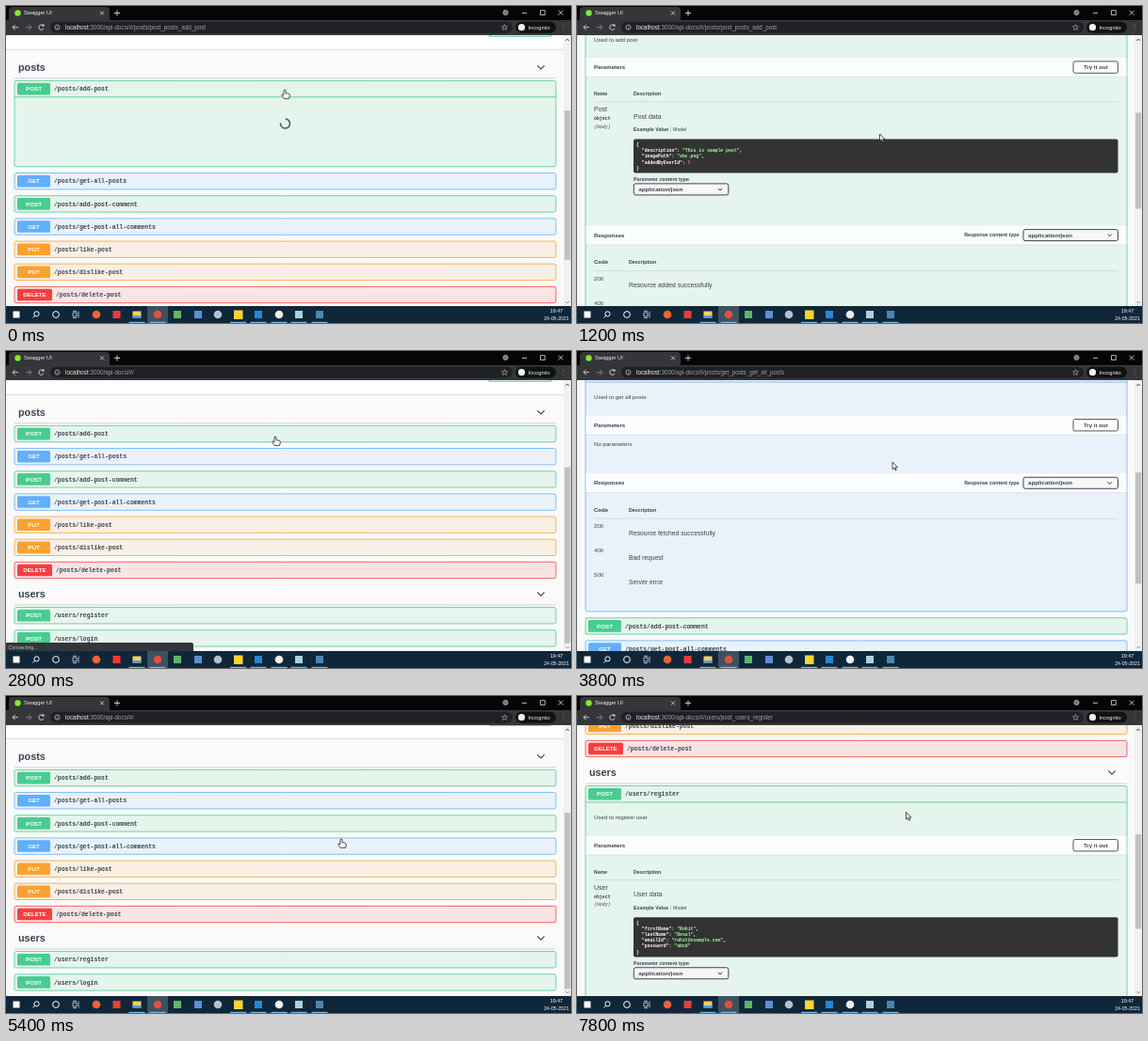
These frames come from a looping animation (600 by 337 pixels, 8000 ms). An HTML page with a canvas:

```html
<!DOCTYPE html>
<html lang="en">
<head>
<meta charset="utf-8">
<title>API docs walkthrough</title>
<style>
html, body { margin: 0; width: 100%; height: 100%; overflow: hidden; background: #fafafa }
canvas { display: block; width: 600px; height: 337px }
</style>
</head>
<body>
<canvas id="stage"></canvas>
<script>
const LOOP = 8000, STEP = 200;
const TOP = 31, BOTTOM = 319, PAGE = 417, INK = '#3b4151';
const SANS = '"Liberation Sans", Arial, sans-serif';
const MONO = '"Liberation Mono", monospace';
const canvas = document.getElementById('stage'), c = canvas.getContext('2d');
const dpr = window.devicePixelRatio || 1;
canvas.width = 600 * dpr;
canvas.height = 337 * dpr;

const COLORS = {
  POST: ['#49cc90', '#e5f4ec'], GET: ['#61affe', '#e9f2fb'],
  PUT: ['#fca130', '#faefe4'], DELETE: ['#f93e3e', '#f9e4e4']
};
const SECTIONS = [
  ['posts', [
    ['POST', '/posts/add-post'], ['GET', '/posts/get-all-posts'],
    ['POST', '/posts/add-post-comment'], ['GET', '/posts/get-post-all-comments'],
    ['PUT', '/posts/like-post'], ['PUT', '/posts/dislike-post'],
    ['DELETE', '/posts/delete-post']]],
  ['users', [['POST', '/users/register'], ['POST', '/users/login']]]
];
const DETAILS = {
  '/posts/add-post': {
    url: 'posts/post_posts_add_post', about: 'Used to add post', body: 'Post',
    fields: [['description', '"This is sample post"'], ['imagePath', '"abc.png"'], ['addedByUserId', '5']],
    done: 'Resource added successfully', extra: 348
  },
  '/posts/get-all-posts': {
    url: 'posts/get_posts_get_all_posts', about: 'Used to get all posts',
    done: 'Resource fetched successfully', extra: 244
  },
  '/users/register': {
    url: 'users/post_users_register', about: 'Used to register user', body: 'User',
    fields: [['firstName', '"Rohit"'], ['lastName', '"Desul"'], ['emailId', '"rohit@example.com"'], ['password', '"abcd"']],
    done: 'User registered successfully', extra: 360
  }
};
// [start, open operation, loading]
const STATES = [
  [0, '/posts/add-post', true], [200, '/posts/add-post'], [2800, ''],
  [3200, '/posts/get-all-posts', true], [3400, '/posts/get-all-posts'], [4800, ''],
  [6000, '/users/register', true], [6200, '/users/register']
];
const SCROLL = [
  [0, 127], [600, 127], [1000, 171], [1200, 204.5], [1400, 215], [1600, 215], [2400, 127],
  [3400, 127], [3800, 215], [4000, 215], [4400, 83], [4800, 83], [5200, 128],
  [6200, 128], [6400, 196], [7000, 304]
];
const POINTER = [
  [0, 296, 89], [400, 296, 89], [800, 320, 130], [1200, 321.5, 136], [1600, 321.5, 136],
  [2400, 286, 91], [2800, 286, 91], [3000, 292, 110], [3200, 292, 110], [3600, 330, 118],
  [4400, 350, 118.5], [4600, 356, 152], [5400, 356, 152], [5800, 358, 278], [6000, 358, 278],
  [6400, 360, 271], [7400, 348.5, 285], [7800, 349.5, 123.5]
];

function at(keys, t) {
  const i = keys.findIndex(k => k[0] > t);
  if (i < 0) return keys[keys.length - 1].slice(1);
  const a = keys[i - 1], b = keys[i], u = (t - a[0]) / (b[0] - a[0]);
  return a.slice(1).map((v, j) => v + (b[j + 1] - v) * u);
}
function rect(x, y, w, h, fill) {
  c.fillStyle = fill;
  c.fillRect(x, y, w, h);
}
function box(x, y, w, h, r, fill, stroke, width = 0.8) {
  c.beginPath();
  c.roundRect(x, y, w, h, r);
  if (fill) { c.fillStyle = fill; c.fill(); }
  if (stroke) { c.strokeStyle = stroke; c.lineWidth = width; c.stroke(); }
}
function disc(x, y, r, fill, stroke) {
  box(x - r, y - r, 2 * r, 2 * r, r, fill, stroke, 1);
}
function line(color, width, ...p) {
  c.beginPath();
  for (let i = 0; i < p.length; i += 2) c.lineTo(p[i], p[i + 1]);
  c.strokeStyle = color;
  c.lineWidth = width;
  c.stroke();
}
// y is the visual middle of the text; returns the right end
function text(s, x, y, size, { color = INK, style = '', font = SANS, align = 'left' } = {}) {
  c.font = `${style} ${size}px ${font}`;
  c.fillStyle = color;
  c.textAlign = align;
  c.fillText(s, x, y + size * 0.34);
  return x + c.measureText(s).width;
}
const bold = (s, x, y, size, opts) => text(s, x, y, size, { style: 'bold', ...opts });
const code = (s, x, y, color) => bold(s, x, y, 4.8, { font: MONO, color });

function band(title, y) {
  rect(0 + 9.5, y - 10, 574, 20, 'rgba(255,255,255,.82)');
  rect(9.5, y + 10, 574, 0.8, 'rgba(0,0,0,.08)');
  bold(title, 18, y, 6.1);
}
function select(x, y) {
  box(x, y - 6, 100.5, 12, 2, '#f7f7f7', '#41444e', 1);
  bold('application/json', x + 5, y, 6.2);
  line('#222', 0.9, x + 89.5, y - 1, x + 91.7, y + 1.2, x + 93.9, y - 1);
}
function rule(y) {
  rect(18, y, 557, 0.6, 'rgba(59,65,81,.2)');
}

function responses(y, d) {
  band('Responses', y);
  bold('Response content type', 469.5, y, 5.3, { align: 'right' });
  select(474, y);
  bold('Code', 18, y + 28.5, 6);
  bold('Description', 55, y + 28.5, 5.3);
  rule(y + 37.5);
  [['200', d.done], ['400', 'Bad request'], ['500', 'Server error']].forEach(([n, s], i) => {
    text(n, 18, y + 46 + 26 * i, 6.1);
    text(s, 55, y + 53 + 26 * i, 6.8);
  });
}

function details(y, d) {
  text(d.about, 18, y + 25, 6.14);
  band('Parameters', y + 54.5);
  box(527, y + 48.3, 47.5, 12.4, 2, '#fff', '#555', 1);
  bold('Try it out', 550.8, y + 54.5, 6.1, { align: 'center' });
  if (!d.body) {
    text('No parameters', 18, y + 75, 6.14);
    responses(y + 116, d);
    return;
  }
  bold('Name', 18, y + 82.7, 5.2);
  bold('Description', 60, y + 82.7, 5.3);
  rule(y + 91);
  text(d.body, 18, y + 99.3, 7);
  bold('object', 18, y + 109, 4.9, { font: MONO });
  text('(body)', 18, y + 117.3, 4.9, { font: MONO, style: 'italic bold', color: '#777' });
  text(d.body + ' data', 60, y + 106.8, 7);
  bold('Example Value', 60, y + 120.5, 5.3);
  rect(99.3, y + 117.5, 0.5, 6, '#aaa');
  text('Model', 102, y + 120.5, 5.3);

  const n = d.fields.length, h = 17.4 + 6.2 * n, end = y + 131 + h;
  box(60, y + 131, 514.5, h, 2, '#333');
  code('{', 63, y + 136.7, '#fff');
  d.fields.forEach(([key, value], i) => {
    const ly = y + 136.7 + 6.2 * (i + 1);
    let x = code(`"${key}"`, 68.8, ly, '#fff');
    x = code(': ', x, ly, '#fff');
    x = code(value, x, ly, value[0] === '"' ? '#a2fca2' : '#d36363');
    if (i < n - 1) code(',', x, ly, '#fff');
  });
  code('}', 63, y + 136.7 + 6.2 * (n + 1), '#fff');
  bold('Parameter content type', 60, end + 6.7, 5.3);
  select(60.3, end + 17.3);
  responses(end + 66, d);
}

function operation([method, path], y, open, loading, extra) {
  const [main, tint] = COLORS[method], wide = method === 'DELETE' ? 37 : 35;
  box(9, y - 8.7, 575, 17.4 + extra, 2, tint, main);
  box(12, y - 6.3, wide, 12.6, 1.5, main);
  bold(method, 12 + wide / 2, y, 6.2, { color: '#fff', align: 'center' });
  bold(path, wide + 16, y, 6.43, { font: MONO });
  if (!open) return;
  rect(9, y + 8.3, 575, 0.8, main);
  if (loading) {
    c.beginPath();
    c.arc(296.5, y + 37, 5, -1.5, 3.3);
    c.strokeStyle = '#555';
    c.lineWidth = 1.5;
    c.stroke();
  } else details(y, DETAILS[path]);
}

// Draws the document; returns whether the pointer is over something clickable
function page(scroll, open, loading, extra, py) {
  let y = 192.5 - scroll, hot = false;
  rect(0, TOP, 600, BOTTOM - TOP, '#fafafa');
  rect(0, y - 61.5, 592, 42, '#fff');
  rect(0, y - 19.5, 592, 1, '#dedede');
  box(513, y - 48.2, 66, 15, 2, '#fff', '#49cc90', 1.1);
  bold('Authorize', 524, y - 40.5, 6.2, { color: '#49cc90' });
  box(562, y - 41, 6, 4.2, 0.6, '#49cc90');
  box(563.2, y - 44, 3.6, 4.5, 1.7, null, '#49cc90', 0.9);
  for (const [title, ops] of SECTIONS) {
    bold(title, 13, y, 10.8);
    line(INK, 1.1, 564.3, y - 2.2, 568, y + 1.5, 571.7, y - 2.2);
    rect(9, y + 11, 575, 0.7, 'rgba(59,65,81,.3)');
    hot ||= Math.abs(py - y) < 11;
    y += 22.6;
    for (const op of ops) {
      const isOpen = op[1] === open, grow = isOpen ? extra : 0;
      hot ||= Math.abs(py - y) < 8.7;
      operation(op, y, isOpen, loading, grow);
      y += 24.15 + grow;
    }
    y += 1.5;
  }
  const total = PAGE + extra, track = 271;
  rect(592, TOP, 8, BOTTOM - TOP, '#f1f1f1');
  rect(593, 41 + scroll / total * track, 6.3, 288 / total * track, '#c1c1c1');
  line('#555', 1, 594.3, 37, 596.2, 35, 598.1, 37);
  line('#999', 1, 594.3, 314, 596.2, 316, 598.1, 314);
  return hot;
}

function browser(route) {
  const pale = '#dadce0';
  rect(0, 0, 600, 16, '#050506');
  rect(0, 15, 600, 16, '#35363a');
  box(3, 1, 107, 15, [4, 4, 0, 0], '#35363a');
  disc(12.5, 7.5, 3.2, '#85ea2d');
  text('Swagger UI', 19, 7.5, 5.7, { color: '#eee' });
  line(pale, 0.8, 100, 5.5, 104, 9.5);
  line(pale, 0.8, 104, 5.5, 100, 9.5);
  line(pale, 0.9, 115, 7.5, 121, 7.5);
  line(pale, 0.9, 118, 4.5, 118, 10.5);
  disc(530.5, 7, 2.6, '#777', '#999');
  line(pale, 0.8, 548, 7.5, 553, 7.5);
  box(567.5, 4.7, 4.8, 4.8, 0, null, pale);
  line(pale, 0.8, 586.5, 4.7, 591.5, 9.7);
  line(pale, 0.8, 591.5, 4.7, 586.5, 9.7);

  line(pale, 0.9, 13, 22.7, 7, 22.7);
  line(pale, 0.9, 9.8, 19.9, 7, 22.7, 9.8, 25.5);
  line('#888', 0.9, 21, 22.7, 27, 22.7);
  line('#888', 0.9, 24.2, 19.9, 27, 22.7, 24.2, 25.5);
  c.beginPath();
  c.arc(37.5, 22.7, 2.7, 0.4, 5.6);
  c.strokeStyle = pale;
  c.lineWidth = 0.9;
  c.stroke();
  rect(38.5, 19.6, 2, 2, pale);
  box(47, 16.7, 491, 12, 6, '#202124');
  disc(54.5, 22.7, 2.5, null, '#aaa');
  rect(54.1, 22.3, 0.8, 2, '#aaa');
  const x = text('localhost', 63, 22.7, 6.28, { color: '#f2f2f2' });
  text(':3000/api-docs/#/' + route, x, 22.7, 6.28, { color: '#9aa0a6' });
  c.beginPath();
  for (let i = 0; i < 10; i++) {
    const a = i * Math.PI / 5 - Math.PI / 2, r = i % 2 ? 1.4 : 3.2;
    c.lineTo(529.5 + r * Math.cos(a), 22.9 + r * Math.sin(a));
  }
  c.closePath();
  c.lineWidth = 0.7;
  c.stroke();
  box(541, 16.7, 43, 12, 6, '#111214');
  disc(547.5, 22.7, 3.6, '#f1f3f4');
  text('Incognito', 554.5, 22.7, 5.7, { color: '#f1f3f4' });
  [20, 22.7, 25.4].forEach(y => disc(592, y, 0.4, pale, null));
}

function taskbar() {
  rect(0, BOTTOM, 600, 18, '#10273a');
  rect(150, BOTTOM, 22, 18, '#3d5160');
  const y = 328, dot = (x, fill) => disc(x, y, 4.3, fill), tile = (x, fill) => rect(x - 4, y - 4, 8, 8, fill);
  rect(7.5, y - 3.5, 7, 7, '#fff');
  disc(32.5, y - 0.7, 2.6, null, '#fff');
  line('#fff', 1, 30.6, y + 1.2, 28.6, y + 3.4);
  disc(53, y, 3.4, null, '#fff');
  box(71, y - 2, 4, 4, 0, null, '#ddd');
  line('#ddd', 0.8, 77, y - 3.5, 77, y + 3.5);
  line('#ddd', 0.8, 71, y - 3.7, 75, y - 3.7);
  line('#ddd', 0.8, 71, y + 3.7, 75, y + 3.7);
  dot(96, '#ef6337');
  tile(117.5, '#ef3b32');
  rect(134.5, y - 3.5, 9, 7, '#f8d061');
  rect(134.5, y + 1, 9, 2.5, '#4aa3df');
  dot(161, '#e3503e');
  tile(182, '#62b568');
  tile(204, '#5d8fd6');
  dot(225, '#b9c0cc');
  rect(242, y - 4.5, 9.5, 9.5, '#fbd433');
  tile(268, '#2389d4');
  dot(290, '#f0f0f0');
  tile(311, '#a9d3dc');
  tile(333, '#4b86ad');
  [139, 161, 246.5, 268, 290, 311, 333].forEach(x => rect(x - 8.5, 335.8, 17, 1.2, '#76b9ed'));
  const opts = { color: '#fff', align: 'center' };
  text('19:47', 584.5, 324, 5.4, opts);
  text('24-05-2021', 584.5, 332, 5.2, opts);
}

function pointer(x, y, hand) {
  const shape = hand
    ? 'M-1 .6Q0-.6 1 .6V3.6L4.6 4.4Q5.4 4.8 5.3 6L4.6 9.4H-.8L-3.4 5.6Q-3.2 4.4-1 5.8Z'
    : 'M0 0V7.6L1.8 6L3 8.8L4.2 8.3L3 5.6H5.4Z';
  const path = new Path2D(shape);
  c.save();
  c.translate(x, y);
  c.fillStyle = '#fff';
  c.fill(path);
  c.strokeStyle = '#222';
  c.lineWidth = 0.8;
  c.stroke(path);
  c.restore();
}

function draw(now) {
  const t = Math.floor(now % LOOP / STEP) * STEP;
  const [, open, loading] = STATES.filter(s => s[0] <= t).pop();
  const d = DETAILS[open], [x, y] = at(POINTER, t);
  const extra = loading ? 74 : d ? d.extra : 0;
  c.setTransform(dpr, 0, 0, dpr, 0, 0);
  const hot = page(at(SCROLL, t)[0], open, loading, extra, y);
  if (t === 2800) {
    box(0, 310, 199, 10, [0, 2, 0, 0], '#35363a');
    text('Connecting...', 2.5, 315, 5.3, { color: '#c4c7cb' });
  }
  browser(d ? d.url : '');
  taskbar();
  pointer(x, y, hot);
}

const start = performance.now();
function tick() {
  draw(performance.now() - start);
  requestAnimationFrame(tick);
}
tick();
</script>
</body>
</html>
```
